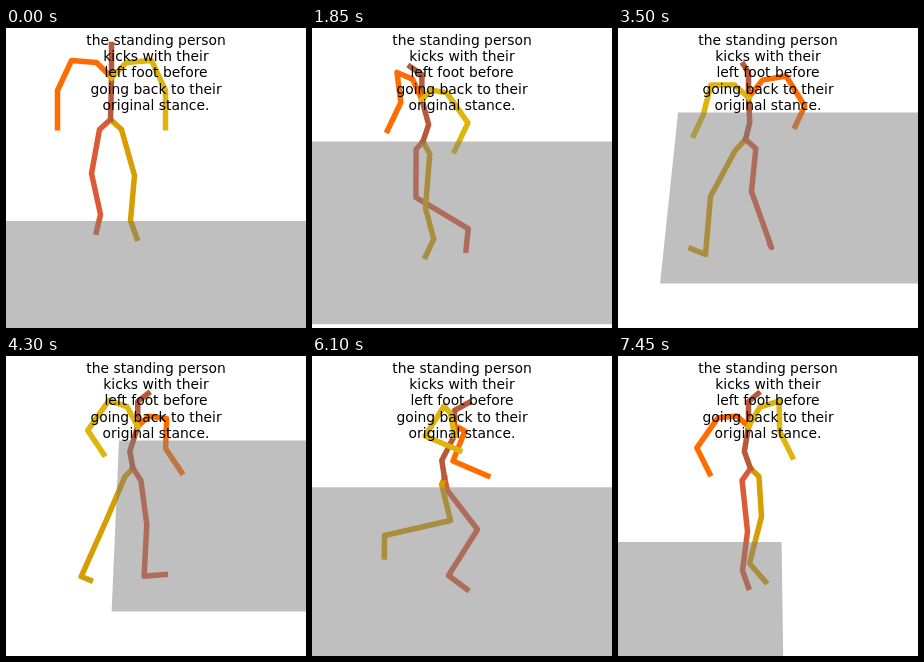
Write an HTML page that moves like this. It is 300 px wide and 300 px high and loops after 7500 ms.

```html
<!DOCTYPE html>
<html lang="en">
<head>
<meta charset="utf-8">
<title>Walking figure</title>
<style>
  html, body { margin: 0; width: 100%; height: 100%; overflow: hidden; background: #fff; }
  svg { display: block; width: 100vw; height: 100vh; }
  polyline { fill: none; stroke-width: 5.5; stroke-linecap: square; stroke-linejoin: round; }
  text { font: 13.89px "DejaVu Sans", sans-serif; text-anchor: middle; }
</style>
</head>
<body>
<svg viewBox="0 0 300 300">
  <g id="body" transform="translate(.5 .5)"></g>
  <polygon id="floor" fill="#808080" fill-opacity=".5"/>
  <g id="title"></g>
</svg>
<script>
const LOOP = 7500, STEP = 50;
const $ = id => document.getElementById(id);

function add(parent, tag, attrs, text = '') {
  const el = document.createElementNS('http://www.w3.org/2000/svg', tag);
  for (const key in attrs) el.setAttribute(key, attrs[key]);
  el.textContent = text;
  return parent.appendChild(el);
}

['the standing person', 'kicks with their', 'left foot before',
 'going back to their', 'original stance.'].forEach((line, i) =>
  add($('title'), 'text', { x: 150, y: 17.2 + 16.1 * i }, line));

const limbs = ['#dd5a37', '#d69e00', '#b75a39', '#ff6d00', '#ddb50e']
  .map(stroke => add($('body'), 'polyline', { stroke }));

// Key poses: turn of the body in degrees, bend of the arms, lean of the
// trunk, then pelvis and each leg's knee and ankle on the stage
const poses = [];
const pose = (t, turn, bend, lean, pelvis, right, left) =>
  poses.push({ t, v: [turn, bend, lean, ...pelvis, ...right, ...left] });

pose(0, 0, 4, 1, [104, 91], [85, 145, 94, 186], [128, 147, 124, 192]);
pose(1000, 20, 16, -4, [109, 108], [98, 170, 115, 210], [134, 175, 143, 186]);
pose(2600, 90, 18, 2, [112, 115], [109, 167, 180, 192], [94, 181, 97, 231]);
pose(3500, 160, 28, 3, [127, 111], [133, 163, 153, 219], [92, 168, 87, 226]);
pose(5100, 260, 18, 7, [126, 114], [147, 173, 130, 220], [114, 163, 67, 211]);
pose(6100, 255, 36, 10, [132, 121], [165, 173, 136, 219], [138, 164, 72, 179]);
pose(7450, 320, 20, -2, [132, 112], [129, 175, 124, 214], [143, 160, 131, 207]);

// Monotone cubic interpolation: smooth, without overshoot
function sample(keys, t) {
  let i = 0;
  while (i < keys.length - 2 && t >= keys[i + 1].t) i++;
  const a = keys[i], b = keys[i + 1], h = b.t - a.t, u = (t - a.t) / h;
  return a.v.map((p, k) => {
    const slope = j => (keys[j + 1].v[k] - keys[j].v[k]) / (keys[j + 1].t - keys[j].t);
    const tangent = j => {
      if (j === 0) return slope(0);
      if (j === keys.length - 1) return slope(j - 1);
      const m = slope(j - 1), n = slope(j);
      return m * n > 0 ? 2 * m * n / (m + n) : 0;
    };
    const d = b.v[k] - p, m = tangent(i) * h, n = tangent(i + 1) * h;
    return p + u * (m + u * (3 * d - 2 * m - n + u * (m + n - 2 * d)));
  });
}

const move = ([x, y], dx, dy) => [x + dx, y + dy];

// Chains of joints; side is -1 for right and 1 for left
function skeleton(t) {
  const [turn, bend, lean, px, py, ...legs] = sample(poses, t);
  const c = Math.cos(turn * Math.PI / 180), s = Math.sin(turn * Math.PI / 180);
  const pelvis = [px, py], chest = move(pelvis, lean, -42);
  const waist = [px + lean / 2 + 8 * s, py - 17];
  const neck = move(chest, 0, -25), head = move(neck, -15 * s, -8);

  function leg(side, [kx, ky, ax, ay]) {
    const hip = move(pelvis, 11 * side * c, 10 + 3 * side * s);
    // The foot points forward and tilts with the shin
    const length = Math.hypot(ax - kx, ay - ky);
    const a = (ax - kx) / length, b = (ay - ky) / length;
    const fx = -22 * s, fy = 6 + 12 * c;
    const toe = [ax + fx * b + fy * a + 8 * side * c, ay - fx * a + fy * b];
    return [pelvis, hip, [kx, ky], [ax, ay], toe];
  }

  function arm(side) {
    const collar = move(chest, 15 * side * c, -15 + 7 * side * s);
    const shoulder = move(chest, 40 * side * c, -17 + 13 * side * s);
    const elbow = move(shoulder, 14 * side * c + 16 * s, 30);
    const hand = move(elbow, -bend * s, 40 - 0.7 * bend);
    return [chest, collar, shoulder, elbow, hand];
  }

  return [leg(-1, legs.slice(0, 4)), leg(1, legs.slice(4)),
    [pelvis, waist, chest, neck, head], arm(-1), arm(1)];
}

function ease(t, from, to, power = 1) {
  const u = Math.min(1, Math.max(0, (t - from) / (to - from))) ** power;
  return u * u * (3 - 2 * u);
}

// A wide rectangle whose sides meet at a vanishing point far above
function floorCorners(t) {
  const top = 193 - 108.5 * ease(t, 0, 2600, 1.22) + 101.5 * ease(t, 4500, 7450, 1.22);
  const bottom = 255.5 + 1.4 * (top - 84.5);
  const left = -50 + 163 * ease(t, 2200, 4300) - 426 * ease(t, 4300, 7700);
  const right = left + 470;
  const down = x => 150 + (x - 150) * (bottom + 770) / (top + 770);
  return [[left, top], [right, top], [down(right), bottom], [down(left), bottom]];
}

function draw(now) {
  const t = Math.floor(now % LOOP / STEP) * STEP;
  skeleton(t).forEach((chain, i) => limbs[i].setAttribute('points', chain.join(' ')));
  $('floor').setAttribute('points', floorCorners(t).join(' '));
}

const start = performance.now();
function tick() {
  draw(performance.now() - start);
  requestAnimationFrame(tick);
}
tick();
</script>
</body>
</html>
```
